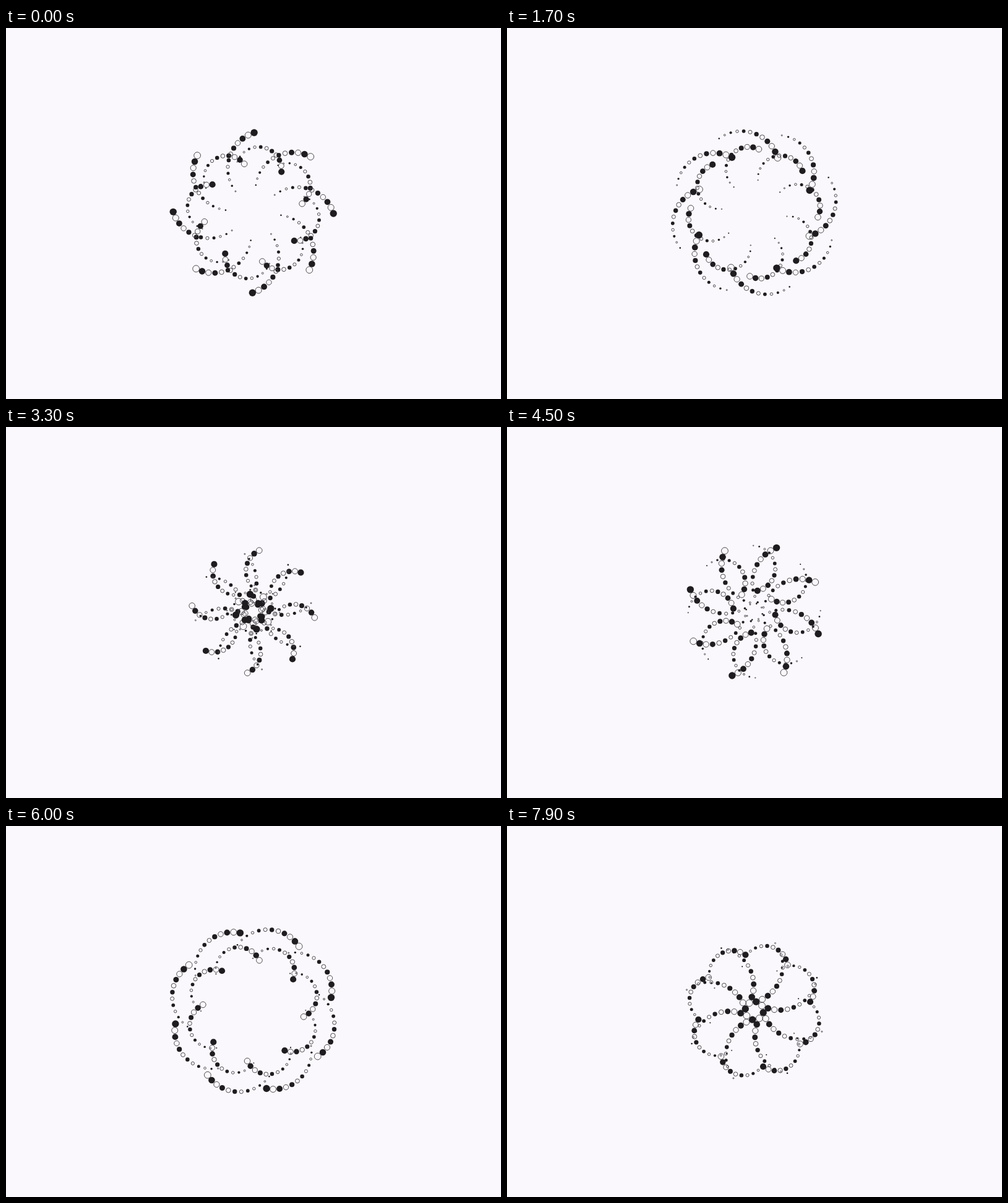
These frames come from a looping animation (800 by 600 pixels, 8 s). An HTML page with a canvas:

```html
<!DOCTYPE html>
<html lang="en">
<head>
<meta charset="utf-8">
<title>Orbiting dots</title>
<style>
  html, body { margin: 0; width: 100%; height: 100%; overflow: hidden; background: #faf8fc; }
  canvas { display: block; width: 800px; height: 600px; }
</style>
</head>
<body>
<canvas id="stage" width="800" height="600"></canvas>
<script>
const ctx = document.getElementById('stage').getContext('2d');
const LOOP = 8000, STEP = 100;
const CX = 399.7, CY = 298.7;
const ARMS = 8, DOTS = 12;
const INK = '#1f1c20', LINE = '#454247', PAPER = '#faf8fc';

// Angles are in degrees, clockwise from the top; speeds are per second.
const rings = [
  { dist: 70, radius: 37, turn: 7.1, turnSpeed: 18, phase: 88.1, speed: 179.5,
    gap: 15, size: 5.1, shrink: 0.37 },
  { dist: 74.1, radius: 60.8, turn: 15.3, turnSpeed: 8, phase: -32.7, speed: 71.8,
    gap: 10, size: 5.7, shrink: 0.4 }
];

function polar(x, y, r, deg) {
  const a = deg * Math.PI / 180;
  return [x + r * Math.sin(a), y - r * Math.cos(a)];
}

function dot(x, y, r, solid) {
  ctx.beginPath();
  ctx.arc(x, y, solid ? r : Math.max(r - 0.3, 0.4), 0, Math.PI * 2);
  if (solid) ctx.fill();
  else ctx.stroke();
}

function drawRing(ring, t) {
  for (let arm = 0; arm < ARMS; arm++) {
    const turn = ring.turn + ring.turnSpeed * t + arm * 360 / ARMS;
    const [x, y] = polar(CX, CY, ring.dist, turn);
    const head = turn + ring.phase + ring.speed * t;
    for (let i = DOTS - 1; i >= 0; i--) {
      const [px, py] = polar(x, y, ring.radius, head - i * ring.gap);
      dot(px, py, ring.size - ring.shrink * i, (arm + i) % 2 === 0);
    }
  }
}

function draw(ms) {
  const sec = ms / 1000;
  // the motion lags slightly around the middle of the loop
  const t = sec - 0.048 * Math.exp(-((sec - 3.9) ** 2));
  ctx.fillStyle = PAPER;
  ctx.fillRect(0, 0, 800, 600);
  ctx.fillStyle = INK;
  ctx.strokeStyle = LINE;
  ctx.lineWidth = 0.95;
  for (const ring of rings) drawRing(ring, t);
}

const start = performance.now();
function frame() {
  const ms = (performance.now() - start) % LOOP;
  draw(Math.floor(ms / STEP) * STEP);
  requestAnimationFrame(frame);
}
frame();
</script>
</body>
</html>
```
